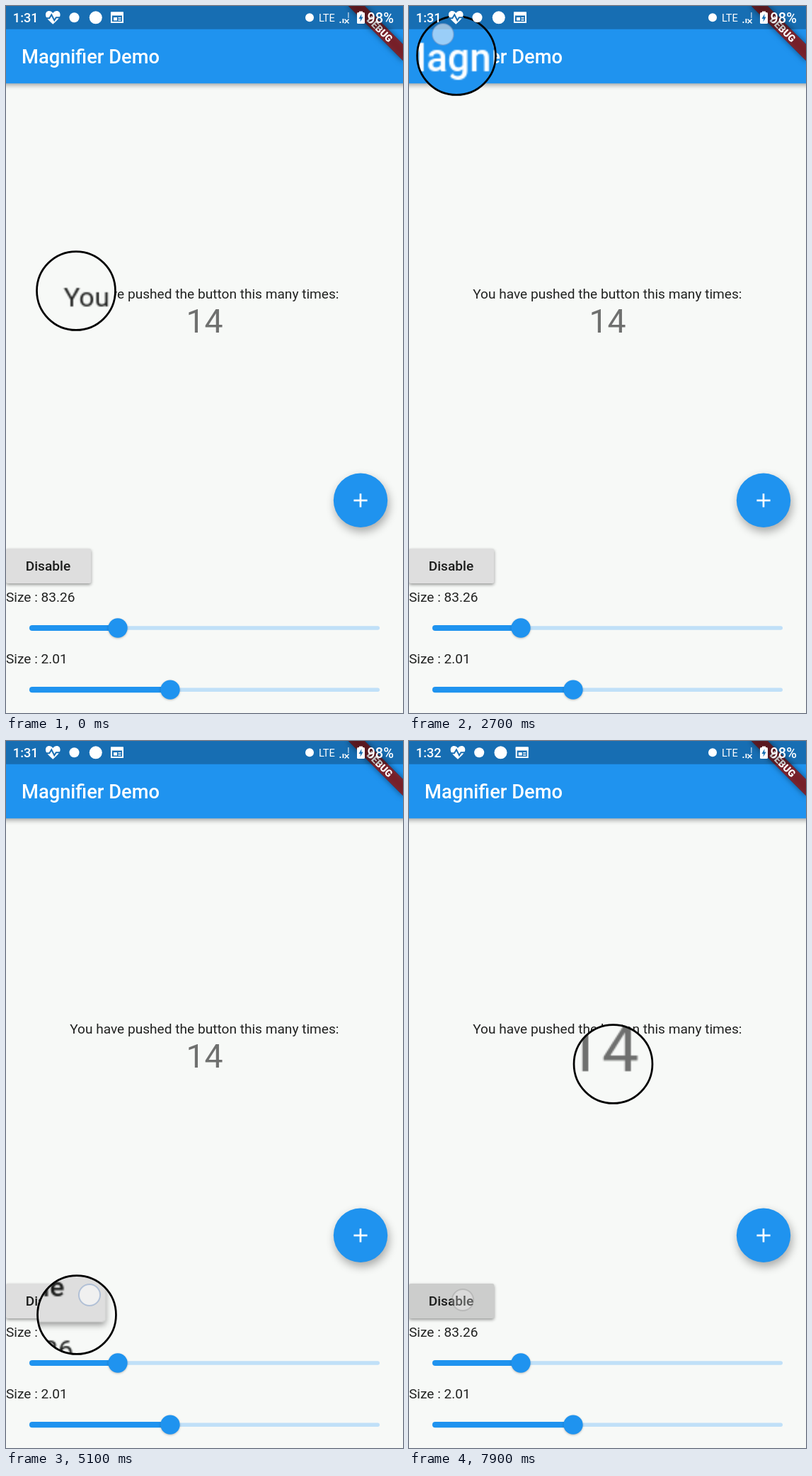
An HTML page with a canvas for the animation above (8000 ms loop, 561 px wide and 998 px high).

```html
<!DOCTYPE html>
<html lang="en">
<head>
<meta charset="utf-8">
<title>Magnifier Demo</title>
<style>
  html, body { margin: 0; width: 100%; height: 100%; overflow: hidden; background: #f7f9f7; }
  canvas { display: block; }
</style>
</head>
<body>
<canvas id="stage" width="561" height="998"></canvas>
<script>
const W = 561, H = 998, LOOP = 8000, STEP = 100;
const DP = 1.365; // pixels per logical unit
const BLUE = '#1f93ef', BAR = '#176eb3', PAPER = '#f7f9f7', INK = '#212221';
const ZOOM = 2.01, LENS = 83.26 * DP / 2;

const view = document.getElementById('stage').getContext('2d');
const sceneCanvas = document.createElement('canvas');
sceneCanvas.width = W;
sceneCanvas.height = H;
const scene = sceneCanvas.getContext('2d');

// lens centre: time, x, y
const path = [
  [800, 99, 402], [1100, 250, 398], [1300, 300, 407], [1400, 277, 412],
  [1500, 259, 417], [2000, 130, 330], [2400, 65, 130], [2700, 67, 70],
  [2800, 68, 45], [3000, 125, 55], [3200, 220, 72], [3400, 337, 141],
  [3500, 394, 251], [3800, 482, 640], [4100, 495, 700], [4400, 440, 722],
  [4800, 180, 806], [5000, 104, 812], [5100, 100, 810], [5200, 138, 787],
  [5600, 235, 610], [6000, 322, 475], [6400, 306, 439], [6500, 291, 429],
  [6700, 284, 444], [7000, 288.5, 456]
];

function slope(i, k) {
  const a = path[Math.max(0, i - 1)], b = path[Math.min(path.length - 1, i + 1)];
  return i === 0 || i === path.length - 1 ? 0 : (b[k] - a[k]) / (b[0] - a[0]);
}

function lensAt(t) {
  const last = path.length - 1;
  if (t <= path[0][0]) return path[0].slice(1);
  if (t >= path[last][0]) return path[last].slice(1);
  const i = path.findIndex(p => p[0] > t) - 1;
  const a = path[i], b = path[i + 1], d = b[0] - a[0], u = (t - a[0]) / d;
  const ease = u * u * (3 - 2 * u);
  return [1, 2].map(k =>
    a[k] + (b[k] - a[k]) * ease +
    d * u * (1 - u) * ((1 - u) * slope(i, k) - u * slope(i + 1, k)));
}

function text(c, s, x, y, size, color, weight = 400, align = 'left') {
  c.font = `${weight} ${size}px Roboto, sans-serif`;
  c.fillStyle = color;
  c.textAlign = align;
  c.fillText(s, x, y);
}

function rect(c, x, y, w, h, color, r = 0) {
  c.fillStyle = color;
  c.beginPath();
  c.roundRect(x, y, w, h, r);
  c.fill();
}

function disc(c, x, y, r, color) {
  c.fillStyle = color;
  c.beginPath();
  c.arc(x, y, r, 0, Math.PI * 2);
  c.fill();
}

function line(c, points, color, width) {
  c.strokeStyle = color;
  c.lineWidth = width;
  c.beginPath();
  points.forEach(p => c.lineTo(...p));
  c.stroke();
}

function shadowed(c, alpha, blur, dx, dy, draw) {
  c.save();
  c.shadowColor = `rgba(0,0,0,${alpha})`;
  c.shadowBlur = blur;
  c.shadowOffsetX = dx;
  c.shadowOffsetY = dy;
  draw();
  c.restore();
}

function slider(c, y, x) {
  rect(c, x, y - 2.7, 528 - x, 5.4, '#c0e0f8', 2.7);
  rect(c, 33, y - 4.1, x - 33, 8.2, BLUE, 4.1);
  shadowed(c, 0.25, 3, 0, 1, () => disc(c, x, y, 13.65, BLUE));
}

function drawScene(c, button) {
  rect(c, 0, 0, W, H, PAPER);
  shadowed(c, 0.38, 7, 0, 2.5, () => rect(c, -10, -10, W + 20, 119.2, BLUE));
  text(c, 'Magnifier Demo', 22, 81, 20 * DP, '#fff', 500);
  text(c, 'You have pushed the button this many times:', 280.3, 413, 14 * DP, INK, 400, 'center');
  text(c, '14', 280.5, 461, 34 * DP, '#6f706f', 400, 'center');
  shadowed(c, 0.33, 13, 2, 6, () => disc(c, 501, 697.8, 38.2, BLUE));
  rect(c, 491.4, 696.6, 19.2, 2.7, '#fff');
  rect(c, 499.6, 688.3, 2.7, 19.2, '#fff');
  shadowed(c, 0.4, 4, 0, 2, () => rect(c, 0, 766, 120.3, 49, button, 2.7));
  text(c, 'Disable', 27.7, 797.3, 14 * DP, '#1b1c1b', 500);
  text(c, 'Size : 83.26', 0, 841, 14 * DP, INK);
  slider(c, 878, 158);
  text(c, 'Size : 2.01', 0, 928.3, 14 * DP, INK);
  slider(c, 965.2, 232);
}

function drawLens(c, x, y) {
  c.save();
  c.beginPath();
  c.arc(x, y, LENS - 0.5, 0, Math.PI * 2);
  c.clip();
  c.translate(x, y);
  c.scale(ZOOM, ZOOM);
  c.drawImage(sceneCanvas, -x, -y);
  c.restore();
  c.strokeStyle = '#000';
  c.lineWidth = 2 * DP;
  c.beginPath();
  c.arc(x, y, LENS - DP, 0, Math.PI * 2);
  c.stroke();
}

function drawBanner(c) {
  const box = [-40 * DP, 28 * DP, 80 * DP, 12 * DP];
  c.save();
  c.translate(W, 0);
  c.rotate(Math.PI / 4);
  shadowed(c, 1, 9, 0, 0, () => rect(c, ...box, 'rgba(0,0,0,.5)'));
  rect(c, ...box, 'rgba(183,28,28,.627)');
  text(c, 'DEBUG', 0, 51.4, 10.2 * DP, '#fff', 900, 'center');
  c.restore();
}

function drawHeart(c, x, y) {
  c.fillStyle = '#fff';
  c.beginPath();
  c.moveTo(x, y + 9.5);
  for (const s of [-1, 1]) {
    c.moveTo(x, y + 9.5);
    c.bezierCurveTo(x + s * 7, y + 3, x + s * 10.3, y, x + s * 10.3, y - 4);
    c.bezierCurveTo(x + s * 10.3, y - 10, x + s * 3, y - 11, x, y - 6.2);
  }
  c.fill();
  line(c, [[x - 11, y + 1], [x - 5, y + 1], [x - 2, y - 4], [x + 2, y + 4], [x + 4.5, y], [x + 11, y]], BAR, 2);
}

function drawStatus(c, t) {
  rect(c, 0, 0, W, 32.8, 'rgba(0,0,0,.25)');
  const late = t >= 5700, dx = late ? 2.7 : 0;
  text(c, late ? '1:32' : '1:31', 9.8, 23, 18.2, '#fff', 500);
  drawHeart(c, 66.3 + dx, 16.3);
  disc(c, 96.5 + dx, 16.3, 7, '#fff');
  disc(c, 126.8 + dx, 16.3, 9, '#fff');
  c.strokeStyle = '#fff';
  c.lineWidth = 2;
  c.strokeRect(149 + dx, 9.5, 16, 13.5);
  rect(c, 148 + dx, 8.5, 18, 5, '#fff', 1);
  rect(c, 152 + dx, 16, 5, 4.5, '#fff');
  rect(c, 158.5 + dx, 16, 4, 1.6, '#fff');
  rect(c, 158.5 + dx, 19, 4, 1.6, '#fff');

  disc(c, 429, 16.3, 6, '#fff');
  text(c, 'LTE', 442, 22, 14.5, '#fff');
  rect(c, 471.5, 22, 1.8, 2, '#fff');
  rect(c, 475.5, 18, 1.8, 6, '#fff');
  rect(c, 483, 9, 1.6, 8, 'rgba(255,255,255,.6)');
  line(c, [[478.5, 18.5], [484.5, 24.5]], '#fff', 1.4);
  line(c, [[484.5, 18.5], [478.5, 24.5]], '#fff', 1.4);
  rect(c, 496, 9, 11, 16, '#fff', 1.5);
  rect(c, 499, 7.5, 5, 3, '#fff');
  c.fillStyle = BAR;
  c.beginPath();
  [[502.5, 11], [498.5, 18], [501, 18], [500.5, 22.5], [504.6, 15.5], [502.2, 15.5]].forEach(p => c.lineTo(...p));
  c.fill();
  text(c, '98%', 510.5, 23.5, 20, '#fff', 500);
}

function drawTouch(c, x, y, alpha, ring) {
  c.save();
  c.globalAlpha = alpha;
  disc(c, x, y, 15, 'rgba(255,255,255,.55)');
  c.strokeStyle = ring;
  c.lineWidth = 2;
  c.beginPath();
  c.arc(x, y, 15, 0, Math.PI * 2);
  c.stroke();
  c.restore();
}

function render(t) {
  const button = t >= 7900 ? '#cccdcc' : t >= 7800 ? '#d6d6d6' : '#dedede';
  drawScene(scene, button);
  view.drawImage(sceneCanvas, 0, 0);
  drawLens(view, ...lensAt(t));
  drawBanner(view);
  drawStatus(view, t);
  if (t >= 800 && t < 7000) {
    // the finger runs slightly ahead of the lens
    const [x, y] = lensAt(t + 100);
    drawTouch(view, x - 20, y - 5, 1, 'rgba(125,155,200,.5)');
  } else if (t >= 7800) {
    drawTouch(view, 76, 789, 0.5, 'rgba(120,120,120,.55)');
  }
}

const start = performance.now();
function tick() {
  const t = (performance.now() - start) % LOOP;
  render(Math.floor(t / STEP) * STEP);
  requestAnimationFrame(tick);
}
tick();
</script>
</body>
</html>
```
